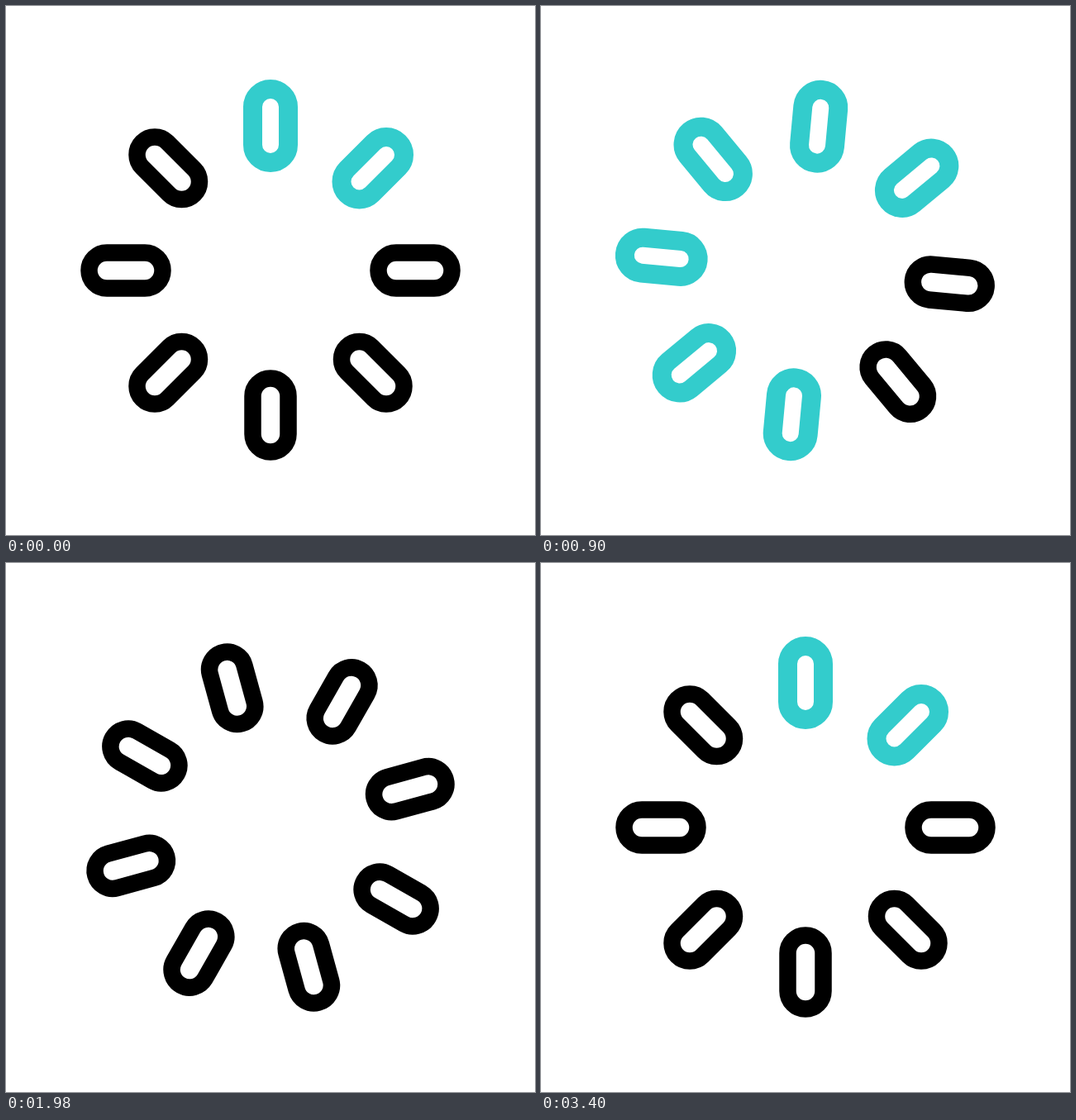
Animation of 640x640 px, one loop 3420 ms. Source, as an HTML page:

```html
<!DOCTYPE html>
<html lang="en">
<head>
<meta charset="utf-8">
<title>Spinner</title>
<style>
  html, body { margin: 0; width: 100%; height: 100%; overflow: hidden; background: #fff; }
  svg { display: block; width: 100%; height: 100%; }
</style>
</head>
<body>
<svg viewBox="0 0 640 640"><g id="wheel" fill="none"></g></svg>
<script>
const COUNT = 8, TURN = 3400, LOOP = 3420, STEP = 20;
const wheel = document.getElementById('wheel');

const pills = Array.from({ length: COUNT }, (_, i) => {
  const pill = document.createElementNS('http://www.w3.org/2000/svg', 'rect');
  const attrs = { x: 298.5, y: 100.5, width: 43, height: 89, rx: 21.5,
                  transform: `rotate(${i * 360 / COUNT} 320 320)` };
  for (const name in attrs) pill.setAttribute(name, attrs[name]);
  wheel.append(pill);
  return pill;
});

// Each pill is teal for half of a colour cycle; two cycles fit in one turn.
function isTeal(i, t) {
  const start = 2.9 + (i + COUNT - 2) % COUNT;
  const phase = t / TURN * 32 - start;
  return (phase % 16 + 16) % 16 < 8;
}

function draw(now) {
  const t = Math.min(Math.floor(now % LOOP / STEP) * STEP, TURN);
  wheel.setAttribute('transform', `rotate(${t / TURN * 360} 320 320)`);
  pills.forEach((pill, i) => {
    const teal = isTeal(i, t);
    pill.setAttribute('stroke', teal ? '#33cccc' : '#000');
    pill.setAttribute('stroke-width', teal ? 23 : 20.5);
  });
}

const begin = performance.now();
function tick() {
  draw(performance.now() - begin);
  requestAnimationFrame(tick);
}
tick();
</script>
</body>
</html>
```
